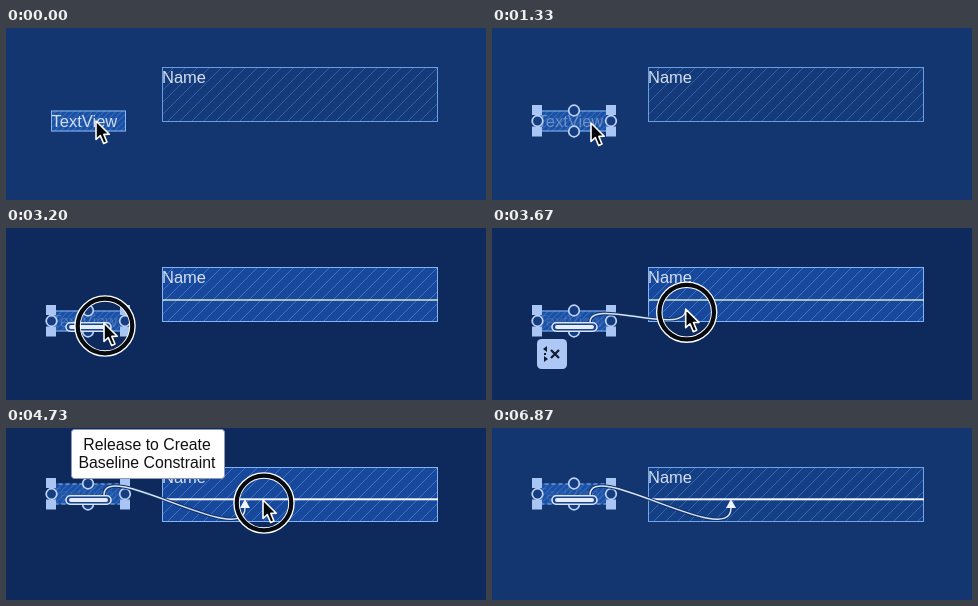
Animation, 480 px wide and 172 px high, one loop 8.54 s. Source, as an HTML page with a canvas:

```html
<!DOCTYPE html>
<html lang="en">
<head>
<meta charset="utf-8">
<title>Baseline constraint</title>
<style>
html, body { margin: 0; width: 480px; height: 172px; overflow: hidden; background: #143670; }
canvas { display: block; }
</style>
</head>
<body>
<canvas id="stage" width="480" height="172"></canvas>
<script>
const ctx = document.getElementById('stage').getContext('2d');
const LOOP = 8540;
const FONT = '"Liberation Sans", Arial, sans-serif';

const clamp = v => Math.max(0, Math.min(1, v));
const ease = v => v * v * (3 - 2 * v);
const ramp = (t, a, b) => ease(clamp((t - a) / (b - a)));
const pulse = (t, a, b, c, d) => ramp(t, a, b) * (1 - ramp(t, c, d));
const mix = (a, b, k) => a + (b - a) * k;
const blend = (a, b, k) => `rgb(${a.map((v, i) => Math.round(mix(v, b[i], k)))})`;

// Eased value through [time, value] keys.
function track(t, keys) {
  let value = keys[0][1];
  for (let i = 1; i < keys.length; i++)
    value = mix(value, keys[i][1], ramp(t, keys[i - 1][0], keys[i][0]));
  return value;
}

function faded(alpha, draw) {
  if (alpha <= 0) return;
  ctx.save();
  ctx.globalAlpha *= alpha;
  draw();
  ctx.restore();
}

function shape(fill, stroke, width = 1) {
  if (fill) { ctx.fillStyle = fill; ctx.fill(); }
  if (stroke) { ctx.strokeStyle = stroke; ctx.lineWidth = width; ctx.stroke(); }
}

function round(x, y, w, h, r, fill, stroke, width) {
  ctx.beginPath();
  ctx.roundRect(x, y, w, h, r);
  shape(fill, stroke, width);
}

function circle(x, y, r, fill, stroke, width) {
  ctx.beginPath();
  ctx.arc(x, y, r, 0, 7);
  shape(fill, stroke, width);
}

function polygon(points, fill, stroke, width) {
  ctx.beginPath();
  points.forEach(p => ctx.lineTo(...p));
  ctx.closePath();
  shape(fill, stroke, width);
}

function text(str, x, y, size, color, align = 'left') {
  ctx.font = `${size}px ${FONT}`;
  ctx.textAlign = align;
  ctx.fillStyle = color;
  ctx.fillText(str, x, y);
}

function hatched(x, y, w, h, gap, fill, line, border, dash = []) {
  ctx.save();
  ctx.beginPath();
  ctx.rect(x, y, w, h);
  ctx.fillStyle = fill;
  ctx.fill();
  ctx.clip();
  ctx.beginPath();
  for (let i = x - h; i < x + w; i += gap) {
    ctx.moveTo(i, y + h);
    ctx.lineTo(i + h, y);
  }
  shape(null, line);
  ctx.restore();
  ctx.save();
  ctx.setLineDash(dash);
  ctx.strokeStyle = border;
  ctx.lineWidth = 1;
  ctx.strokeRect(x + .5, y + .5, w - 1, h - 1);
  ctx.restore();
}

function nameBox(t) {
  const glow = track(t, [[2470, 0], [2800, 1], [5070, 1], [5870, .35]]);
  hatched(156, 39, 276, 55, 12,
    blend([20, 58, 121], [24, 72, 156], glow),
    blend([48, 96, 166], [60, 115, 195], glow),
    blend([104, 158, 226], [128, 180, 245], glow));
  text('Name', 156, 55, 16.5, '#d5dfee');
  faded(ramp(t, 2500, 2750), () => {
    const target = 1 - ramp(t, 4130, 4300);
    ctx.fillStyle = blend([244, 248, 255], [222, 240, 205], target);
    ctx.fillRect(157, mix(70.3, 71.3, target), 275, t > 3800 ? 2 : 1.4);
  });
}

function textView(t, cy) {
  const selected = ramp(t, 200, 400);
  hatched(45, cy - 10.5, 75, 21, 6, '#1c50a4', '#3a76c4', '#8ab8f2',
    t > 3900 ? [4, 3] : []);
  const alpha = track(t, [[200, 1], [400, .5], [1100, .5], [1700, .25], [3300, .25], [3900, .1]]);
  faded(alpha, () => text('TextView', 45.5, cy + 5.5, 16.5, '#d5dfee'));
  faded(selected, () => {
    for (const x of [45, 119])
      for (const y of [cy - 11, cy + 10.5]) {
        ctx.fillStyle = '#a9c5f4';
        ctx.fillRect(x - 5, y - 5, 10, 10);
      }
    for (const [dx, dy] of [[-36.5, 0], [37, 0], [0, -10.5], [0, 10.5]])
      circle(82 + dx, cy + dy, 5.3, '#153d80', '#bed3f7', 1.7);
  });
  faded(ramp(t, 1300, 2050), () => {
    round(60, cy + 1.7, 45, 8.6, 4.3, '#1b4386', '#d7e4fb', 1.6);
    round(63, cy + 4, 39, 4, 2, '#e4edfd');
  });
}

function link(t, cy, tip) {
  if (t < 3330) return;
  const snap = ramp(t, 3700, 3850);
  const x = mix(tip[0], 239, snap), y = mix(tip[1], 80, snap);
  const pull = 42 * clamp((x - 98) / 141);
  const curve = () => {
    ctx.beginPath();
    ctx.moveTo(98, cy + 1);
    ctx.bezierCurveTo(98, cy + 1 - pull * .88, x, y + pull, x, y);
  };
  curve();
  shape(null, '#123267', 3.5);
  curve();
  shape(null, '#d8e5fb', 1.5);
  faded(snap, () => polygon([[239, 71], [244, 80], [234, 80]], '#edf3ff'));
}

function icon(t, cy) {
  const alpha = t < 4700 ? pulse(t, 3450, 3650, 4250, 4500) : pulse(t, 5070, 5250, 6080, 6200);
  faded(alpha, () => {
    ctx.translate(60, cy + 33);
    round(-15, -15, 30, 30, 4.5, '#aec8f5');
    ctx.beginPath();
    for (const s of [-1, 1]) {
      ctx.moveTo(-1, s * 4 - 4);
      ctx.lineTo(7, s * 4 - 4 + 0);
    }
    ctx.beginPath();
    ctx.moveTo(-1, -4); ctx.lineTo(7, 4);
    ctx.moveTo(7, -4); ctx.lineTo(-1, 4);
    shape(null, '#101b30', 2.2);
    polygon([[-9, -5], [-5, -8], [-5, -2]], '#101b30');
    polygon([[-4, 5], [-8, 2], [-8, 8]], '#101b30');
    ctx.fillRect(-8, -1, 2, 2);
  });
}

function tooltip(t, cy) {
  faded(pulse(t, 3780, 3880, 5070, 5200), () => {
    const y = cy - 65;
    round(65.5, y + .5, 153, 49, 3, '#fff', '#8d9bb2', 1);
    text('Release to Create', 141, y + 20.5, 15.8, '#111', 'center');
    text('Baseline Constraint', 141, y + 38.5, 15.8, '#111', 'center');
  });
}

function pressRing(t, [x, y]) {
  const alpha = t < 1000 ? pulse(t, 130, 270, 480, 730) : pulse(t, 2470, 2670, 4930, 5130);
  faded(alpha, () => {
    circle(x + 1, y + 3, 27.5, null, '#fff', 6.5);
    circle(x + 1, y + 3, 27.3, null, '#070a10', 4.2);
  });
}

function cursor(t, [x, y]) {
  faded(1 - ramp(t, 5740, 5870), () => {
    ctx.translate(x, y);
    ctx.lineJoin = 'round';
    polygon([[0, 0], [0, 18.5], [4.3, 14.6], [7.6, 22.5], [11, 21], [7.8, 13.4], [13.3, 13.2]],
      '#05070b', '#fff', 1.6);
  });
}

function draw(t) {
  const dark = pulse(t, 2470, 3000, 5070, 5650);
  ctx.fillStyle = blend([20, 54, 112], [14, 42, 92], dark);
  ctx.fillRect(0, 0, 480, 172);

  const cy = mix(93, 66, ramp(t, 3910, 4200));
  const tip = [
    track(t, [[0, 90], [70, 90], [270, 96], [1000, 96], [1300, 99], [2400, 99], [2500, 98],
      [3330, 98], [3930, 257], [5130, 257], [5350, 260], [5450, 260], [5850, 432]]),
    track(t, [[0, 93], [1000, 93], [1300, 95], [3330, 95], [3930, 72], [5450, 72], [5850, 88]])
  ];
  nameBox(t);
  textView(t, cy);
  link(t, cy, tip);
  icon(t, cy);
  tooltip(t, cy);
  pressRing(t, tip);
  cursor(t, tip);
}

const start = performance.now();
function tick() {
  draw((performance.now() - start) % LOOP);
  requestAnimationFrame(tick);
}
tick();
</script>
</body>
</html>
```
